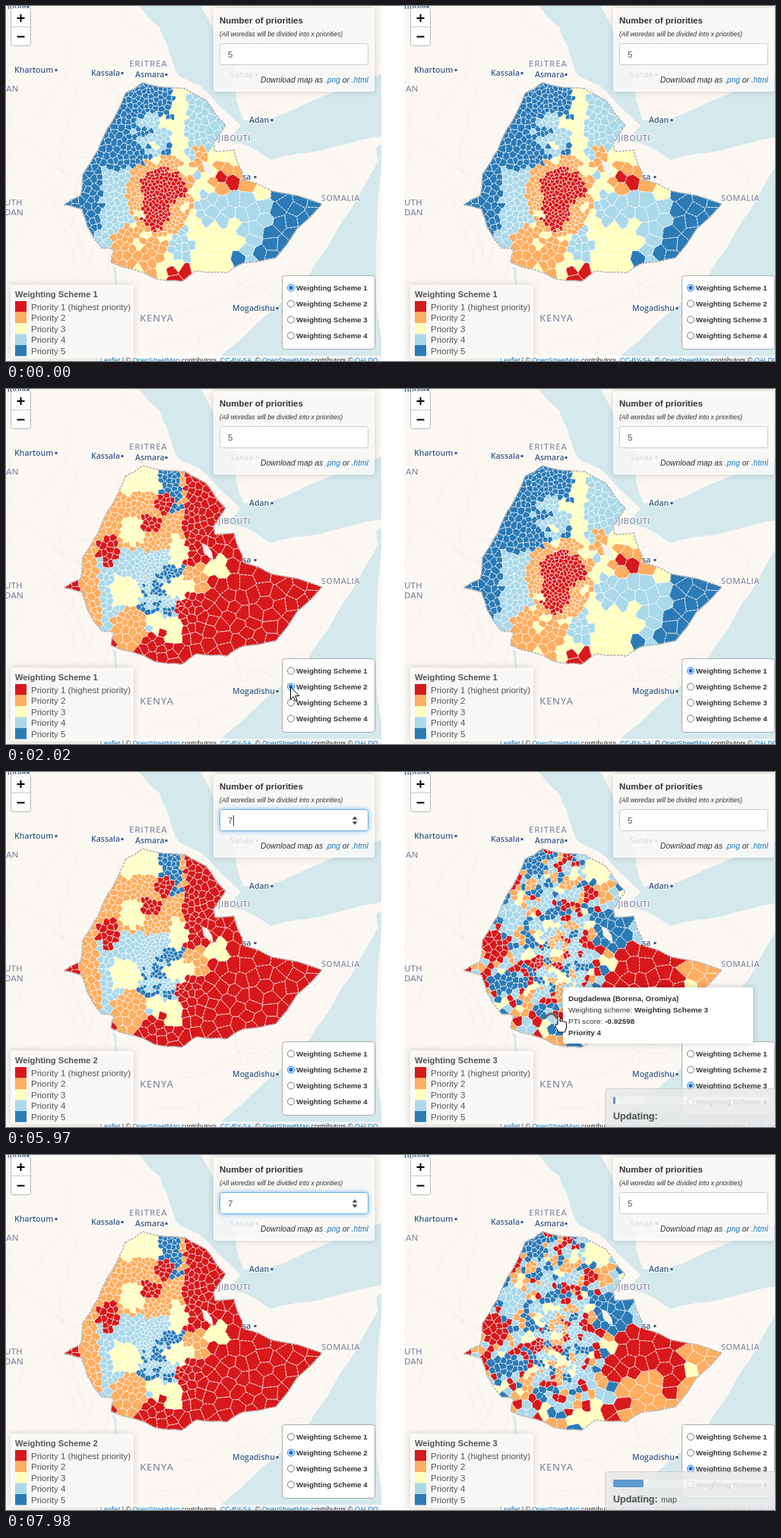
Write an HTML page with a canvas that moves like this. It is 1012 px wide and 468 px high and loops after 8 s.

```html
<!DOCTYPE html>
<html lang="en">
<head>
<meta charset="utf-8">
<title>Priority maps</title>
<style>
  html, body { margin: 0; width: 100%; height: 100%; overflow: hidden; background: #fefefe; }
  canvas, svg { position: absolute; left: 0; top: 0; width: 1012px; height: 468px; }
  text { font-family: "Liberation Sans", Arial, sans-serif; white-space: pre; }
  .card { filter: drop-shadow(0 0 5px rgba(0, 0, 0, .2)); }
  .glow { filter: drop-shadow(0 0 3px rgba(102, 175, 233, .8)); }
</style>
</head>
<body>
<canvas id="map" width="1012" height="468"></canvas>
<svg id="ui" viewBox="0 0 1012 468"></svg>
<script>
const LOOP = 8000, RIGHT = 526, WIDTH = 496, HEIGHT = 468;
const COLORS = ['', '#d7191c', '#fdae61', '#ffffbf', '#abd9e9', '#2c7bb6'];

function randomizer(seed) {
  return () => (seed = (seed * 16807) % 2147483647) / 2147483647;
}

function pathOf(points, closed = true) {
  return new Path2D('M' + points.join('L') + (closed ? 'Z' : ''));
}

// Splits every edge and shifts its middle sideways, for natural borders.
function roughen(points, amount = .09, rounds = 2) {
  const rnd = randomizer(31);
  for (; rounds; rounds--) {
    points = points.flatMap(([x, y], i) => {
      const [u, v] = points[(i + 1) % points.length], k = (rnd() - .5) * 2 * amount;
      return [[x, y], [(x + u) / 2 + (v - y) * k, (y + v) / 2 - (u - x) * k]];
    });
  }
  return points;
}

const country = pathOf(roughen([
  [157,115],[180,101],[236,109],[263,124],[289,157],[273,181],[275,192],[300,190],[311,219],[313,229],
  [350,244],[416,261],[355,332],[312,339],[291,352],[251,349],[231,363],[195,359],[138,338],[142,321],
  [126,319],[107,291],[100,268],[76,262],[98,250],[101,222],[121,190],[140,152]
], .05));
const gap = pathOf([[258,203],[264,206],[271,215],[273,226],[260,216]]);

const within = (x, y) => (cx, cy, rx, ry = rx) => Math.hypot((x - cx) / rx, (y - cy) / ry) < 1;

// A steady random value for each square patch of the map.
function patch(x, y, size) {
  const n = Math.sin(Math.floor(x / size) * 12.99 + Math.floor(y / size) * 78.23) * 43758.5;
  return n - Math.floor(n);
}

// Each scheme gives the priority of a district from its place.
const schemes = {
  1(x, y) {
    const near = within(x, y), speck = patch(x, y, 10);
    if (near(232, 352, 21, 12) || near(292, 229, 20, 6)) return 1;
    if (near(207, 238, 31, 25) || near(197, 268, 18, 30)) return 1;
    if (x > 345 || near(300, 339, 14) || near(333, 322, 14)) return 5;
    if (near(204, 250, 45, 54) || near(172, 328, 40, 40)) return speck < .12 ? 3 : 2;
    if (near(300, 224, 32, 20) || near(254, 202, 9, 20)) return 2;
    if (y < 192 && x > 220) return x < 237 ? 3 : speck < .12 ? 5 : 4;
    if (y < 215 && x < 222) return near(195, 168, 28) ? (speck < .3 ? 5 : speck < .5 ? 3 : 4) : 5;
    if (x < 126) return y < 300 ? 5 : 4;
    if (x < 165) return 4;
    if (near(278, 266, 33, 20) || near(230, 312, 13, 22) || (x > 308 && y > 255)) return 4;
    return y < 245 && x < 250 && speck < .25 ? 4 : 3;
  },
  2(x, y) {
    const near = within(x, y), speck = patch(x, y, 8);
    if (near(207, 152, 14) || near(192, 176, 13) || near(134, 212, 13, 22)) return 1;
    if (y < 163 && x < 231) return x > 203 ? 5 : y < 136 ? 3 : 2;
    if (near(168, 188, 18) || near(226, 214, 11, 20)) return 3;
    if (y < 213 && x < 236) return 2;
    if (near(227, 262, 19, 14) || near(278, 237, 15) || near(157, 266, 21)) return 3;
    if (near(250, 249, 16)) return 2;
    if (x < 123) return x < 95 ? 1 : 2;
    if (near(218, 318, 14, 19) || near(196, 306, 13)) return 3;
    if (near(162, 316, 24, 28)) return 2;
    if (Math.abs(x + y - 464) < 20 && x > 175 && x < 236) return speck < .65 ? 5 : 4;
    return x < 225 && y < 320 ? (near(200, 292, 22, 14) && speck < .6 ? 5 : 4) : 1;
  },
  3(x, y) {
    const near = within(x, y), speck = patch(x, y, 9);
    if (near(276, 209, 28)) return 5;
    if (near(253, 128, 19)) return 3;
    if (near(243, 158, 12) || near(118, 232, 15, 20)) return 1;
    if (near(170, 125, 18, 15) || near(130, 279, 20, 13)) return 5;
    if (near(140, 187, 17)) return 4;
    if (x > 358 || (x > 285 && y > 292)) return near(350, 300, 16) ? 1 : near(365, 285, 9, 18) ? 3 : 2;
    if (x > 274 && y > 230) return 1;
    return [1, 1, 2, 2, 3, 4, 4, 4, 5, 5][Math.floor(speck * 10)];
  }
};

const scratch = document.createElement('canvas').getContext('2d');

// Districts are small in the middle and large towards the east.
function spacing(x, y) {
  if (within(x, y)(204, 252, 36, 46)) return 3.7;
  const east = Math.max(0, x - 225) * (y > 200 ? .12 : .07);
  const west = Math.max(0, 175 - x) * .03;
  return Math.min(14, 5 + east + west + Math.max(0, y - 295) * .09);
}

function scatter() {
  const rnd = randomizer(4711), sites = [];
  for (let i = 0; i < 26000; i++) {
    const x = 70 + rnd() * 350, y = 95 + rnd() * 275;
    if (!scratch.isPointInPath(country, x, y)) continue;
    const r = spacing(x, y);
    if (sites.every(s => (s.x - x) ** 2 + (s.y - y) ** 2 > r * r)) {
      sites.push({ x, y, r, jx: (rnd() - .5) * 5, jy: (rnd() - .5) * 5 });
    }
  }
  return sites;
}

// Keeps the part of a polygon that is nearer to a than to b.
function clipHalf(poly, a, b) {
  const nx = b.x - a.x, ny = b.y - a.y;
  const side = p => (p[0] - (a.x + b.x) / 2) * nx + (p[1] - (a.y + b.y) / 2) * ny;
  const out = [];
  poly.forEach((p, i) => {
    const q = poly[(i + 1) % poly.length], sp = side(p), sq = side(q);
    if (sp <= 0) out.push(p);
    if ((sp < 0) !== (sq < 0)) {
      const k = sp / (sp - sq);
      out.push([p[0] + (q[0] - p[0]) * k, p[1] + (q[1] - p[1]) * k]);
    }
  });
  return out;
}

const sites = scatter();
for (const s of sites) {
  const d = s.r * 3;
  let poly = [[s.x - d, s.y - d], [s.x + d, s.y - d], [s.x + d, s.y + d], [s.x - d, s.y + d]];
  for (const o of sites) {
    if (o !== s && Math.hypot(o.x - s.x, o.y - s.y) < d * 2.9) poly = clipHalf(poly, s, o);
  }
  s.path = pathOf(poly);
}

function drawBase(c) {
  c.fillStyle = '#fbf8f3';
  c.fillRect(-2, 0, WIDTH, HEIGHT);

  const rnd = randomizer(99);
  c.strokeStyle = '#f5eee7';
  for (let i = 0; i < 46; i++) {
    let x = rnd() * 490, y = rnd() * 468, a = rnd() * 6.3;
    const line = [[x, y]];
    for (let k = 0; k < 12; k++) {
      a += (rnd() - .5) * .9;
      line.push([x += Math.cos(a) * 10, y += Math.sin(a) * 10]);
    }
    c.stroke(pathOf(line, false));
  }

  const gulf = [[173,-2],[202,28],[213,54],[222,84],[230,94],[255,105],[273,123],[309,158],[294,177],
    [313,182],[348,203],[382,195],[443,183],[498,171],[498,87],[441,109],[382,135],[348,149],[313,151],
    [298,98],[297,66],[271,28],[255,-2]];
  const ocean = [[498,180],[487,188],[490,204],[459,260],[430,306],[400,352],[356,397],[292,453],[276,470],[498,470]];
  const lake = [[140,343],[145,346],[149,378],[145,376]];
  c.fillStyle = '#d5e8eb';
  for (const water of [gulf, ocean, lake]) c.fill(pathOf(roughen(water, .04)));

  const label = (text, x, y, size, color, spread = 0) => {
    c.font = `600 ${size}px "Open Sans", sans-serif`;
    c.letterSpacing = spread + 'px';
    c.lineWidth = 2;
    c.strokeStyle = 'rgba(255,255,255,.7)';
    c.strokeText(text, x, y);
    c.fillStyle = color;
    c.fillText(text, x, y);
  };
  const land = '#8d90a3', town = '#3d5a80';
  label('ERITREA', 162, 80, 11.5, land, .8);
  label('DJIBOUTI', 271, 178, 11, land, .3);
  label('SOMALIA', 415, 257, 11, land, .3);
  label('KENYA', 176, 416, 13, land, .7);
  label('UTH', -2, 263, 11.5, land);
  label('DAN', -2, 276, 11.5, land);
  label('AN', 0, 113, 11.5, land);
  [['nqola', -2, 4, 29], ['Khartoum', 11, 88, 66], ['Kassala', 112, 92, 153], ['Asmara', 170, 94, 211],
   ['Adan', 320, 154, 350], ['Sanaa', 295, 94, 330], ['Hargeisa', 278, 229, 328],
   ['Mogadishu', 298, 402, 357]].forEach(([name, x, y, dot]) => {
    label(name, x, y, 10.5, town);
    c.fillRect(dot - 1.5, y - 5, 3, 3);
  });
}

function buildMap(priority) {
  const canvas = document.createElement('canvas');
  canvas.width = WIDTH;
  canvas.height = HEIGHT;
  const c = canvas.getContext('2d');
  c.translate(2, 0);
  drawBase(c);
  c.save();
  c.clip(country);
  c.lineWidth = .6;
  for (const s of sites) {
    c.fillStyle = c.strokeStyle = COLORS[priority(s.x + s.jx, s.y + s.jy)];
    c.fill(s.path);
    c.stroke(s.path);
  }
  c.strokeStyle = 'rgba(255,255,255,.85)';
  c.lineWidth = .8;
  c.setLineDash([3, 1.5]);
  for (const s of sites) c.stroke(s.path);
  c.restore();
  c.fillStyle = '#f5f2ee';
  c.fill(gap);
  c.strokeStyle = '#b9b9bb';
  c.lineWidth = 1.8;
  c.setLineDash([3, 1.5]);
  c.stroke(country);
  return canvas;
}

const text = (x, y, size, body, color = '#333', extra = '') =>
  `<text x="${x}" y="${y}" font-size="${size}" fill="${color}" ${extra}>${body}</text>`;
const box = (x, y, w, h, fill, extra = '') =>
  `<rect x="${x}" y="${y}" width="${w}" height="${h}" fill="${fill}" ${extra}/>`;
const BOLD = 'font-weight="700"', ITALIC = 'font-style="italic"', LINK = '#1f78b4';
const link = s => `<tspan fill="${LINK}">${s}</tspan>`;
const under = s => `<tspan fill="${LINK}" text-decoration="underline">${s}</tspan>`;

function zoomButtons() {
  return box(6.5, 2.5, 26, 50, '#fff', 'rx="3" stroke="#b8b8b8"') +
    '<path d="M7 27.5H32" stroke="#ccc"/><path d="M14.5 16H24.5M19.5 11V21M14.5 40.5H24.5" stroke="#000" stroke-width="2"/>';
}

function numberCard({ count, focus, caret }) {
  return box(273, 3, 212, 110, 'rgba(255,255,255,.82)', 'rx="4" class="card"') +
    text(281, 23, 11.5, 'Number of priorities', '#333', BOLD) +
    text(281, 40, 8.5, '(All woredas will be divided into x priorities)', '#333', ITALIC) +
    box(281.5, 49.5, 195, 28, '#fff', `rx="3" stroke="${focus ? '#66afe9' : '#ccc'}" ${focus ? 'class="glow"' : ''}`) +
    text(292, 67.5, 11.5, count, '#555') +
    (focus ? '<path d="M455.5 62.5l3.5-4 3.5 4zM455.5 65.5l3.5 4 3.5-4z" fill="#444"/>' : '') +
    (caret ? '<path d="M299.5 57V71" stroke="#333"/>' : '') +
    text(335, 101, 10.25, `Download map as ${link('.png')} or ${link('.html')}`, '#333', ITALIC);
}

function legend({ legend }) {
  const rows = ['1 (highest priority)', 2, 3, 4, 5].map((name, i) =>
    box(12, 389 + i * 14.5, 15, 14.5, COLORS[i + 1]) +
    text(33, 400.5 + i * 14.5, 11.5, 'Priority ' + name, '#555'));
  return box(6, 367.5, 162, 97, 'rgba(255,255,255,.82)', 'rx="4" class="card"') +
    text(12, 384, 11.15, 'Weighting Scheme ' + legend, '#555', BOLD) + rows.join('');
}

function radios({ radio }) {
  const rows = [1, 2, 3, 4].map(n => {
    const y = 350.5 + n * 21, on = n === radio;
    return `<circle cx="375" cy="${y}" r="4.5" fill="#fff" stroke="${on ? '#0b6fe0' : '#767676'}"/>` +
      (on ? `<circle cx="375" cy="${y}" r="2.7" fill="#0b6fe0"/>` : '') +
      text(382, y + 3.5, 9.6, 'Weighting Scheme ' + n, '#333', BOLD);
  });
  return box(363.5, 355.5, 122, 97, '#fff', 'rx="4" stroke="#aaa"') + rows.join('');
}

function credits() {
  const osm = `© ${under('OpenStreetMap')} contributors`;
  return box(122, 461, 372, 7, 'rgba(255,255,255,.6)') +
    text(124, 469.5, 8.8, `${under('Leaflet')} | ${osm}, ${under('CC-BY-SA')}, ${osm} © ${under('QALDO')}`);
}

const panel = (state, x) => `<g transform="translate(${x})">` +
  zoomButtons() + numberCard(state) + legend(state) + radios(state) + credits() + '</g>';

const arrow = (x, y) =>
  `<path transform="translate(${x} ${y})" d="M0 0V16l3.7-3.5 2.5 5.7 2.5-1-2.5-5.6H11.5Z" fill="#fff" stroke="#000"/>`;
const halo = (x, y) =>
  `<circle cx="${x}" cy="${y}" r="35" fill="rgba(255,250,0,.54)" style="mix-blend-mode:multiply"/>`;

function tooltip() {
  const line = (y, s, extra) => text(740, y, 9.95, s, '#333', extra);
  const b = s => `<tspan ${BOLD}>${s}</tspan>`;
  return '<path d="M709 325q9-13 19 0" fill="none" stroke="#666" stroke-width="3"/>' +
    box(733, 284, 250, 74, '#fff', 'rx="3" class="card"') +
    line(302, 'Dugdadewa (Borena, Oromiya)', BOLD) +
    line(317, 'Weighting scheme: ' + b('Weighting Scheme 3')) +
    line(332, 'PTI score: ' + b('-0.92598')) +
    line(347, 'Priority 4', BOLD) +
    '<path d="M726 333V323q1.5-3 3 0v6q1.5-2 3 0 1.5-1.5 3 .5 2-1 2.5 1.5v6l-2 6h-8l-5-8q0-3 3.500-2Z" fill="#fff" stroke="#000"/>';
}

function progress(width, task) {
  return '<g opacity=".85">' + box(788.5, 417.5, 230, 60, '#e8e8e8', 'rx="3" stroke="#ccc"') +
    box(799, 428, 205, 10, '#f1f1f1', 'rx="2"') +
    box(799, 428, width, 10, '#428bca', 'rx="2"') +
    text(799, 458, 12.6, 'Updating:', '#333', BOLD) + text(862, 458, 10.8, task) + '</g>';
}

const start = { scheme: 1, legend: 1, radio: 1, count: 5 };
const picked = { ...start, scheme: 2, radio: 2 };
const second = { ...picked, legend: 2 };
const typed = { ...second, count: 7, focus: true };
const third = { ...start, scheme: 3, radio: 3, legend: 3 };

const steps = [
  { at: 0, left: start, right: start, top: '' },
  { at: 1000, left: start, right: start, top: halo(375, 392) + arrow(374.5, 393) },
  { at: 2020, left: picked, right: start, top: arrow(374.5, 393) },
  { at: 3980, left: second, right: start, top: halo(898, 414) + arrow(898.5, 414) },
  { at: 5010, left: second, right: { ...third, legend: 1 }, top: arrow(898.5, 414) },
  { at: 5970, left: { ...typed, caret: true }, right: third, top: tooltip() + progress(3, '') },
  { at: 6970, left: typed, right: third, top: progress(20, 'map') },
  { at: 7980, left: typed, right: third, top: progress(40, 'map') }
];

const ctx = document.getElementById('map').getContext('2d');
const ui = document.getElementById('ui');
const maps = Object.fromEntries(Object.entries(schemes).map(([k, rule]) => [k, buildMap(rule)]));
let shown;

function show(step) {
  if (step === shown) return;
  shown = step;
  ctx.clearRect(0, 0, 1012, HEIGHT);
  ctx.drawImage(maps[step.left.scheme], -2, 0);
  ctx.drawImage(maps[step.right.scheme], RIGHT - 2, 0);
  ui.innerHTML = panel(step.left, 0) + panel(step.right, RIGHT) + step.top;
}

const begin = performance.now();
function tick() {
  const t = (performance.now() - begin) % LOOP;
  show(steps.findLast(s => s.at <= t));
  requestAnimationFrame(tick);
}
tick();
</script>
</body>
</html>
```
